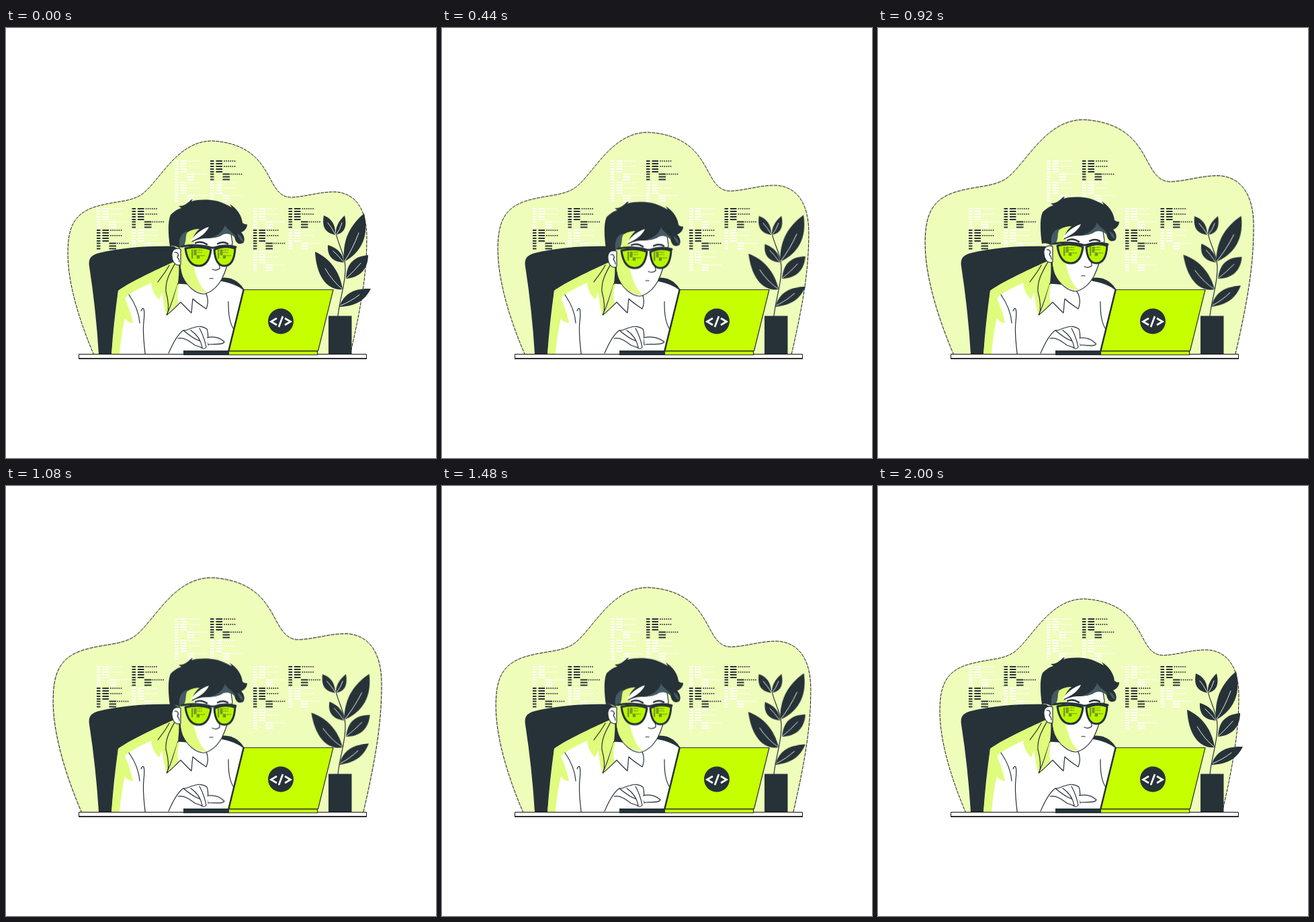
An HTML page without scripts for the animation above (2040 ms loop, 640 px wide and 640 px high).

```html
<!DOCTYPE html>
<html lang="en">
<head>
<meta charset="utf-8">
<title>Coder at the desk</title>
<style>
  html, body { margin: 0; width: 100%; height: 100%; overflow: hidden; background: #fff; }
  svg { display: block; width: 100%; height: 100%; }
  .dark { fill: #263238; }
  .grey { fill: #455a64; }
  .lime { fill: #c6ff00; }
  .tint { fill: #e0fc7c; }
  .white { fill: #fff; }
  .line { fill: none; stroke: #263238; stroke-width: 1.2; stroke-linecap: round; stroke-linejoin: round; }
  .edge { stroke: #263238; stroke-width: 1.2; stroke-linejoin: round; }
  .thick { stroke-width: 2.5; }

  .blob, .head, .leaf, .finger { animation: 2.04s infinite; }

  .blob {
    fill: #eefdba; stroke: #000; stroke-width: .9; stroke-dasharray: 5 1.2;
    transform-origin: 314.5px 488px;
    animation-name: swell; animation-timing-function: ease-in-out;
  }
  @keyframes swell {
    0%, 98.04%, 100% { transform: scale(1); }
    49.02% { transform: scale(1.1); }
  }

  .head { animation-name: bob; }
  @keyframes bob {
    0% { transform: none; animation-timing-function: ease-out; }
    13.7% { transform: translateY(4.8px); animation-timing-function: ease-in; }
    29.4% { transform: none; animation-timing-function: ease-out; }
    39.2% { transform: translateY(-5px); animation-timing-function: linear; }
    45.1% { transform: translateY(-4px); animation-timing-function: linear; }
    51% { transform: none; animation-timing-function: ease-out; }
    62.7% { transform: translateY(4.8px); animation-timing-function: ease-in; }
    73.5% { transform: none; animation-timing-function: ease-out; }
    85.3% { transform: translateY(-4.9px); animation-timing-function: ease-in; }
    98.04%, 100% { transform: none; }
  }

  .leaf { animation-name: sway; }
  .leaf path + path { fill: none; stroke: #fff; stroke-width: .9; stroke-linecap: round; }
  @keyframes sway {
    0% { transform: none; animation-timing-function: cubic-bezier(.39, .575, .565, 1); }
    49.02% { transform: rotate(var(--a)); animation-timing-function: cubic-bezier(.47, 0, .745, .715); }
    98.04%, 100% { transform: none; }
  }

  .finger { transform-origin: 294px 465px; animation-name: tap; animation-timing-function: ease-in-out; }
  @keyframes tap {
    0%, 62.7%, 98.04%, 100% { transform: none; }
    13.7%, 29.4% { transform: scaleX(1.18); }
    45.1% { transform: rotate(6deg); }
  }
</style>
</head>
<body>
<svg viewBox="0 0 640 640" xmlns="http://www.w3.org/2000/svg">
  <defs>
    <g id="code" fill="none" stroke="currentColor">
      <path stroke-width="1.900" d="M0 1h5.500M0 5h5.500M0 9h5.500M0 13h5.500M0 17h5.500M0 20.500h5.500M0 24.500h5.500M0 28.500h5.500M8.500 1h9.500M8.500 5h9.500M8.500 9h9.500M8.500 13h9.500M8.500 17h9.500M18.500 20.500h10.500M18.500 24.500h10.500M18.500 28.500h10.500"/>
      <path stroke-width="1.900" stroke-linecap="round" stroke-dasharray="0 3.100" d="M21 1h16M21 9h16M31 20.500h16"/>
    </g>
  </defs>

  <path class="blob" d="M131 487C113 445 92 385 92 335C92 296 102 277 130 267C160 257 185 260 203 247C230 226 255 168 307 168C340 170 366 181 383 207C398 229 402 252 425 252C448 251 468 243 492 244C522 247 537 272 537 312C537 360 531 405 512 487Z"/>

  <g color="#fff">
    <use href="#code" x="135" y="268"/>
    <use href="#code" x="187.500" y="300"/>
    <use href="#code" x="251" y="197"/>
    <use href="#code" x="251" y="229"/>
    <use href="#code" x="304" y="229"/>
    <use href="#code" x="368" y="268"/>
    <use href="#code" x="420.500" y="300"/>
    <use href="#code" x="368" y="332"/>
  </g>
  <g color="#263238">
    <use href="#code" x="187.500" y="268"/>
    <use href="#code" x="135" y="300"/>
    <use href="#code" x="304" y="197"/>
    <use href="#code" x="420.500" y="268"/>
    <use href="#code" x="368" y="300"/>
  </g>

  <!-- plant -->
  <path class="line" d="M494 429C497 400 506 380 505 355C504 335 494 322 491 305"/>
  <g class="dark">
    <g class="leaf" style="--a:-4deg;transform-origin:490px 308px">
      <path d="M490 308C474 305 470 295 473 279C486 284 491 295 490 308Z"/><path d="M490 307Q485 297 479 290"/>
    </g>
    <g class="leaf" style="--a:4deg;transform-origin:491px 308px">
      <path d="M491 308C504 305 508 295 504 279C494 288 490 298 491 308Z"/><path d="M492 307Q497 300 500 290"/>
    </g>
    <g class="leaf" style="--a:6.3deg;transform-origin:503px 348px">
      <path d="M503 348C501 320 508 297 533 276C540 306 532 332 503 348Z"/><path d="M504 347Q516 329 525 305"/>
    </g>
    <g class="leaf" style="--a:5deg;transform-origin:503px 349px">
      <path d="M503 349C486 348 478 340 479 323C493 327 502 336 503 349Z"/><path d="M502 348Q495 339 487 332"/>
    </g>
    <g class="leaf" style="--a:4.5deg;transform-origin:506px 373px">
      <path d="M506 373C507 350 518 340 539 338C539 360 525 372 506 373Z"/><path d="M507 372Q518 362 528 350"/>
    </g>
    <g class="leaf" style="--a:-6deg;transform-origin:501px 389px">
      <path d="M501 389C478 391 462 370 460 333C481 342 497 362 501 389Z"/><path d="M500 388Q486 377 475 358"/>
    </g>
    <g class="leaf" style="--a:-6deg;transform-origin:496px 415px">
      <path d="M496 415C503 395 518 387 543 388C534 406 520 414 496 415Z"/><path d="M498 413Q513 407 526 397"/>
    </g>
    <path d="M480 428.500h34.500V485H480Z"/>
  </g>

  <!-- chair -->
  <path class="dark" d="M124 355C122 343 127 338 138 335C170 327 212 324 250 325L275 340L250 349C215 364 180 381 167 391Q160 440 157 485H138Q134 420 124 355Z"/>
  <path class="dark" d="M310 374C334 366 348 378 355 390L320 392Z"/>

  <!-- shirt -->
  <path class="tint" d="M157 485L167 391C190 375 230 357 252 347L300 376L319 376C336 379 348 385 354 390L333 485Z"/>
  <path class="white" d="M169 485C171 464 173 448 177 432C180 437 184 439 189 439C186 424 181 412 177 402C186 393 202 386 216 379C217 391 222 398 228 404C230 399 231 396 232 393C235 404 234 418 240 428C246 425 251 416 256 402L262 378L319 376C336 379 348 385 354 390L333 485Z"/>
  <path class="dark" d="M257 345C258 360 257 372 256 380C264 382 274 382 285 380L292 360Z"/>
  <path class="line" d="M319 376C336 379 348 385 354 390M183 397C192 410 198 424 199 439M201 421C205 412 207 420 205 437C203 456 206 471 207 485M243 353C237 364 231 371 226 378M253 348C244 364 237 376 238 392C242 407 243 418 240 427M331 407C331 424 332 436 338 447"/>
  <path class="white edge" d="M256 380C250 398 246 414 239 427C247 421 255 413 260 408C264 412 271 420 276 424C277 415 277 409 278 403C284 409 292 414 298 418C303 406 299 395 294 390L280 382Z"/>
  <path class="tint" d="M255 382C250 400 247 412 241 425C248 419 253 414 257 409Q253 397 258 382Z"/>

  <!-- head -->
  <g class="head">
    <path class="white edge" d="M258 320C259 345 258 357 263 370C270 385 282 395 294 396C304 394 314 386 321 374C327 362 331 350 337 320L334 300L270 290Z"/>
    <path class="tint" d="M258.500 318C259 345 259 357 263.500 370C270 385 282 394 299 394C289 386 283 372 279 352L280 320L276 300H262Z"/>
    <path class="white edge" d="M260 329C251 326 246 331 247 340C248 350 254 355 260 352Z"/>
    <path class="line" d="M251 334C256 333 258 338 255 341Q258 344 258 348"/>
    <path class="dark" d="M244 325C241 305 241 287 245 278C250 273 256 269 261 268L257 265C265 265 268 262 273 258Q275 255 278 255L276 258C290 254 311 255 324 261Q331 264 336 267L333 262C344 269 351 279 352 290Q356 293 359 292C359 298 355 302 350 304C355 309 356 316 353 320C346 323 342 320 340 311C336 307 331 306 326 305C318 312 307 313 297 313C289 313 282 316 274 320L263 326L257 327Q251 323 244 325Z"/>
    <path class="grey" d="M258 326C257 314 259 306 270 302C267 310 272 314 266 323ZM305 312C317 308 324 301 326 293C329 301 338 303 342 311C333 305 325 305 320 309Q314 312 305 312ZM344 306Q352 309 353 318Q348 317 344 306Z"/>
    <path class="tint" d="M263 327C270 318 266 309 270 304C276 300 283 299 288 299C281 305 277 312 276 322Z"/>
    <path class="white" d="M274 318C281 307 291 299 302 296C299 304 288 313 274 318Z"/>
    <path class="line thick" d="M282 320Q290 316 299 322M315 321Q323 317 330 321"/>
    <path class="line" d="M313 341C315 348 319 353 318 358Q313 362 307 359M303 373Q306 372 308 373"/>
    <g class="edge" fill="#b9f500" style="stroke-width:3">
      <path d="M267 328C278 325 295 325 305 330C303 345 298 354 287 354C275 354 269 343 267 328Z"/>
      <path d="M310 330C320 325 332 325 341 328C340 345 335 354 325 354C315 354 311 345 310 330Z"/>
      <path fill="none" stroke-linecap="round" d="M262 325C277 322 295 323 305 327H310C321 323 332 323 342 326"/>
    </g>
    <g color="#263238">
      <use href="#code" transform="translate(276 330) scale(.42 .43)"/>
      <use href="#code" transform="translate(315 330) scale(.42 .43)"/>
    </g>
  </g>

  <!-- hand -->
  <path class="white" d="M242 484C248 470 255 456 264 450L278 446C286 443 295 444 299 448L301 470L292 480Z"/>
  <path class="line" d="M242 484C248 470 255 456 264 450C269 451 273 447 279 446C286 443 294 444 299 448C302 455 300 464 301 472M264 450C271 456 280 463 289 466M256 462C265 460 273 466 281 472L292 476M275 450C284 456 290 465 292 475M288 447C293 456 296 465 298 475Q294 480 290 475"/>
  <path class="white edge finger" d="M299 461C307 459 317 460 325 467C323 472 311 470 301 471"/>

  <!-- desk -->
  <path fill="#fff" stroke="#111" d="M108.500 485.500H536.500V492H108.500Z"/>
  <path stroke="#111" stroke-width="1.500" d="M108 492H537"/>

  <!-- laptop -->
  <path class="dark" d="M264 480H332V487H264Z"/>
  <path class="lime edge" d="M331.500 481H463.500V486.500H331.500Z"/>
  <path class="lime edge" d="M354 389.500H487L464.500 480.500H331.500Z"/>
  <path class="line thick" d="M353.500 390L331.500 480"/>
  <circle class="dark" cx="409" cy="436.500" r="19"/>
  <path fill="none" stroke="#fff" stroke-width="2.700" d="M403 432L394.500 437L403 442M412 429L406 445M415 432L423.500 437L415 442"/>
</svg>
</body>
</html>
```
